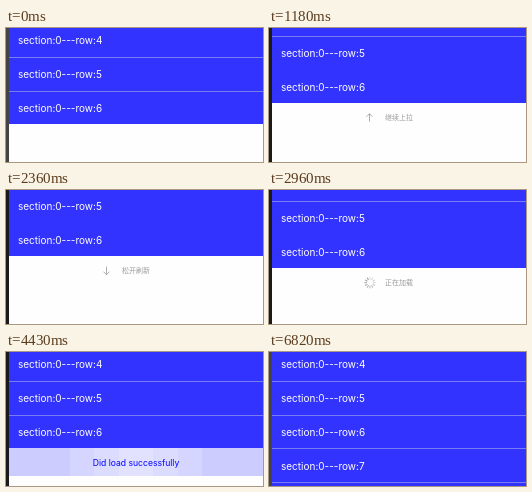
An HTML page with a canvas for the animation above (6.92 s loop, 257 by 134 pixels).

```html
<!DOCTYPE html>
<html lang="zh">
<head>
<meta charset="utf-8">
<title>Pull up to load more</title>
<style>
  html, body { margin: 0; width: 100%; height: 100%; overflow: hidden; background: #fefefe; }
  canvas { display: block; }
</style>
</head>
<body>
<canvas id="stage" width="257" height="134"></canvas>
<script>
const ctx = document.getElementById('stage').getContext('2d');
const W = 257, H = 134, LEFT = 3, ROW = 33.75, BOTTOM = 96, LOOP = 6920, STEP = 147.5;
const BLUE = '#3333ff', LINE = '#7c7cf2', GRAY = '#999', PAPER = '#fefefe';
const READY = 2050, RELEASE = 2940, DONE = 4120, RELOAD = 5780;

const pull = [[442, 0], [590, 4], [885, 14], [1180, 21], [1622, 24.5], [2360, 30],
              [2802, 30], [2950, 18], [3097, 4], [3245, 0]];

const ramp = (t, a, b) => Math.min(1, Math.max(0, (t - a) / (b - a)));

function along(points, t) {
  let value = points[0][1];
  for (let i = 1; i < points.length; i++) {
    const [t0, v0] = points[i - 1], [t1, v1] = points[i];
    if (t > t0) value = v0 + (v1 - v0) * ramp(t, t0, t1);
  }
  return value;
}

function rect(x, y, w, h, color) {
  ctx.fillStyle = color;
  ctx.fillRect(x, y, w, h);
}

function text(str, x, y, font, color, align = 'left') {
  ctx.font = font;
  ctx.fillStyle = color;
  ctx.textAlign = align;
  ctx.fillText(str, x, y);
}

function drawRows(shift, count) {
  rect(LEFT, 0, W - LEFT, count > 3 ? H : Math.round(BOTTOM - shift), BLUE);
  for (let i = 0; i < count; i++) {
    const y = i * ROW - shift;
    text('section:0---row:' + (4 + i), 12, Math.round(y + 16.4), '10px Inter, sans-serif', '#fff');
    // the hairline under the second row drops out while scrolling
    const hidden = i === 1 && shift > 0;
    const last = i === 2 && count === 3;
    if (!hidden && !last) rect(LEFT, Math.floor(y + 29.3), W - LEFT, 1, LINE);
  }
}

function drawArrow(t, y) {
  const turn = ramp(t, 520, 830) - ramp(t, READY, READY + 250);
  ctx.save();
  ctx.translate(100.5, y);
  ctx.rotate(turn * Math.PI);
  ctx.strokeStyle = GRAY;
  ctx.lineWidth = 0.8;
  ctx.beginPath();
  ctx.moveTo(0, -4);
  ctx.lineTo(0, 4);
  ctx.moveTo(-3, 1);
  ctx.lineTo(0, 4);
  ctx.lineTo(3, 1);
  ctx.stroke();
  ctx.restore();
}

function drawSpinner(t, y) {
  const head = Math.floor(t / 1000 * 12) % 12;
  ctx.save();
  ctx.translate(101, y);
  ctx.strokeStyle = '#888';
  ctx.lineWidth = 1;
  for (let i = 0; i < 12; i++) {
    ctx.globalAlpha = 0.25 + 0.6 * (1 - ((head - i + 12) % 12) / 12);
    ctx.beginPath();
    ctx.moveTo(0, -3);
    ctx.lineTo(0, -5.7);
    ctx.stroke();
    ctx.rotate(Math.PI / 6);
  }
  ctx.restore();
}

function drawFooter(t, shift) {
  const loading = t >= RELEASE;
  const label = loading ? '正在加载' : t >= READY ? '松开刷新' : '继续上拉';
  const y = 110.7 - shift;
  if (!loading) ctx.globalAlpha = shift > 0 ? Math.min(1, shift / 14 + 0.2) : 0;
  text(label, 116, y + 2.6, '7px "Noto Sans CJK SC", "Noto Sans CJK", sans-serif', GRAY);
  if (loading) drawSpinner(t, y);
  else drawArrow(t, y);
  ctx.globalAlpha = 1;
}

// The banner opens from its middle, in bands that get lighter inwards
function drawBanner(t) {
  const half = 127 * ramp(t, 4080, 4335), mid = (LEFT + W) / 2;
  ctx.save();
  ctx.beginPath();
  ctx.rect(mid - half, BOTTOM, half * 2, 28);
  ctx.clip();
  rect(LEFT, BOTTOM, W - LEFT, 28, '#ccccff');
  for (const r of [66, 42, 17]) rect(mid - r, BOTTOM, r * 2, 28, 'rgba(255,255,255,0.17)');
  text('Did load successfully', mid, 114, '8.6px Inter, sans-serif', '#0000ff', 'center');
  ctx.restore();
}

function draw(now) {
  const time = now % LOOP;
  const t = Math.floor((time + 8) / STEP) * STEP;
  const shift = along(pull, t);
  rect(0, 0, W, H, PAPER);
  drawRows(shift, time >= RELOAD ? 4 : 3);
  if (time < RELOAD) {
    if (t < DONE) drawFooter(t, shift);
    else drawBanner(t);
  }
  rect(0, 0, LEFT, H, time < 300 || time >= 6820 ? '#444' : '#1a1a1a');
}

const start = performance.now();
function frame() {
  draw(performance.now() - start);
  requestAnimationFrame(frame);
}
frame();
</script>
</body>
</html>
```
